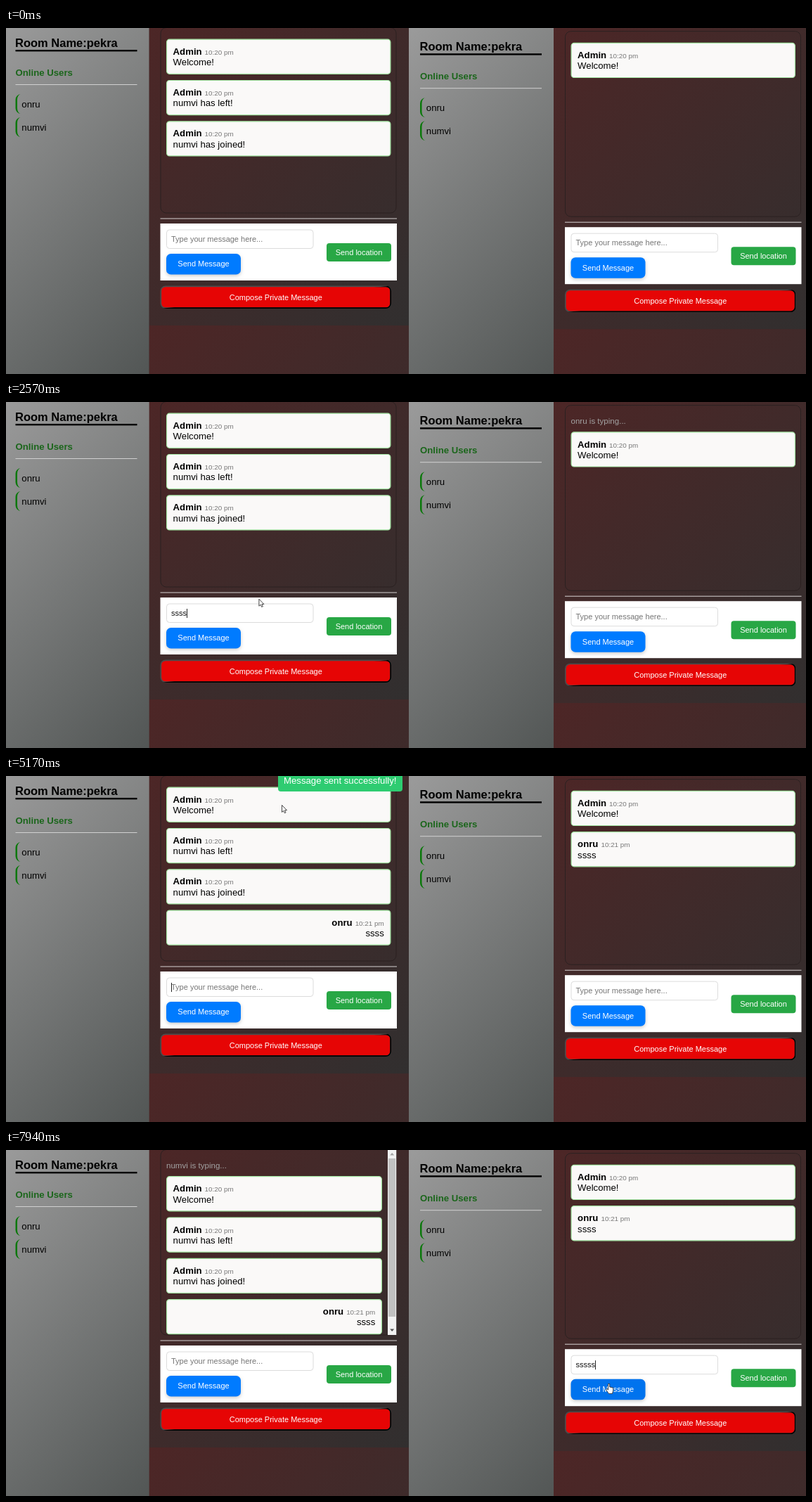
An HTML page with a canvas that plays this animation: 1138 px wide and 492 px high, repeating every 8 s.

```html
<!DOCTYPE html>
<html lang="en">
<head>
<meta charset="utf-8">
<title>Two chat windows</title>
<style>
  html, body { margin: 0; width: 100%; height: 100%; overflow: hidden; background: #3a2b2b; }
  canvas { display: block; }
</style>
</head>
<body>
<canvas id="stage" width="1138" height="492"></canvas>
<script>
const ctx = document.getElementById('stage').getContext('2d');
const LOOP = 8000;
const SANS = '"Liberation Sans", Arial, sans-serif';
const ROOM = 'pekra', FIRST = 'onru', SECOND = 'numvi';
const LEFT = { x: 0, y: 0 }, RIGHT = { x: 575.5, y: 5.2 };

// Moments in ms
const FOCUS_LEFT = 1150, PRESS = 3730, SENT = 3860, FOCUS_RIGHT = 6590, TOAST_END = 6860;
const LEFT_TYPING = { start: 1420, every: 265, count: 4 };
const RIGHT_TYPING = { start: 6880, every: 150, count: 5 };

// Layout at 82.5 % page zoom
const BODY = 13.2, SMALL = 11, TINY = 9.9;
const box = (x, y, w, h) => ({ x, y, w, h });
const CHAT = box(219.5, -1, 336, 264.5);
const INPUT = box(228, 286.5, 209.5, 27.5);
const SEND = box(228, 321, 106, 29.5);
const LOCATE = box(456, 306, 92, 26);
const PRIVATE = box(219.5, 366.5, 328.5, 32.5);

// Each pointer move starts where the last one ended; bend bows it sideways
const move = (start, end, x, y, bend = 0) => ({ start, end, x, y, bend });
const MOVES = [
  move(0, 70, 775, 440),
  move(70, 550, 309, 303),
  move(2420, 2760, 430, 247),
  move(2770, 3200, 290, 303, -1.5),
  move(3270, 3470, 268, 331),
  move(4160, 4960, 402, 3, .35),
  move(5030, 5580, 341, 235),
  move(5600, 5980, 430, 145),
  move(5990, 6410, 857, 302, -.7),
  move(7200, 7560, 965, 385),
  move(7800, 7950, 857, 332, -.4)
];

const clamp = (v, lo, hi) => Math.min(hi, Math.max(lo, v));
const smooth = k => k * k * (3 - 2 * k);

function pointer(t) {
  const i = Math.max(0, MOVES.findLastIndex(m => m.start <= t));
  const b = MOVES[i], a = MOVES[Math.max(0, i - 1)];
  const u = smooth(clamp((t - b.start) / (b.end - b.start), 0, 1));
  const dx = b.x - a.x, dy = b.y - a.y, bow = 2 * u * (1 - u) * b.bend;
  return { x: a.x + dx * u - dy * bow, y: a.y + dy * u + dx * bow };
}

const inside = (p, b, o) =>
  p.x >= b.x + o.x && p.x <= b.x + o.x + b.w && p.y >= b.y + o.y && p.y <= b.y + o.y + b.h;

const hovered = (t, b, o) => t >= 70 && inside(pointer(t), b, o);

// Share of the last 180 ms spent over a box: a colour transition without stored state
function hoverFade(t, b, o) {
  let hits = 0;
  for (let ago = 0; ago < 180; ago += 10) hits += hovered(t - ago, b, o);
  return hits / 18;
}

const typed = (k, t) => clamp(Math.floor((t - k.start) / k.every) + 1, 0, k.count);

// The caret blinks from the last focus or key press
function caretOn(t, focus, end, keys) {
  if (t < focus || t >= end) return false;
  const n = keys ? typed(keys, t) : 0;
  const since = n ? keys.start + (n - 1) * keys.every : focus;
  return Math.floor((t - since) / 530) % 2 === 0;
}

const mix = (a, b, k) => `rgb(${a.map((v, i) => Math.round(v + (b[i] - v) * k))})`;

function text(str, x, y, size, color, { bold = false, align = 'left', font = SANS } = {}) {
  ctx.font = `${bold ? 'bold ' : ''}${size}px ${font}`;
  ctx.textAlign = align;
  ctx.fillStyle = color;
  ctx.fillText(str, x, y);
  return ctx.measureText(str).width;
}

function rect(x, y, w, h, color) {
  ctx.fillStyle = color;
  ctx.fillRect(x, y, w, h);
}

function round(b, r, fill, stroke, line = 1) {
  const i = stroke ? line / 2 : 0;
  ctx.beginPath();
  ctx.roundRect(b.x + i, b.y + i, b.w - 2 * i, b.h - 2 * i, r);
  if (fill) { ctx.fillStyle = fill; ctx.fill(); }
  if (stroke) { ctx.strokeStyle = stroke; ctx.lineWidth = line; ctx.stroke(); }
}

function clipped(b, paint) {
  ctx.save();
  ctx.beginPath();
  ctx.rect(b.x, b.y, b.w, b.h);
  ctx.clip();
  paint();
  ctx.restore();
}

function diagonal(x, y, w, h, from, to) {
  const cx = x + w / 2, cy = y + h / 2, d = (w + h) / 4;
  const g = ctx.createLinearGradient(cx - d, cy - d, cx + d, cy + d);
  g.addColorStop(0, from);
  g.addColorStop(1, to);
  rect(x, y, w, h, g);
}

function sidebar() {
  diagonal(-3, -17, 206.5, 520, '#9c9c9c', '#515554');
  text('Room Name:' + ROOM, 13, 27, 16.5, '#000', { bold: true });
  rect(13.5, 31, 173, 2.4, '#000');
  text('Online Users', 13.5, 67.7, BODY, '#1b661b', { bold: true });
  rect(13.5, 80, 173, 1, '#d0d0d0');
  [FIRST, SECOND].forEach((name, i) => {
    const y = 94 + i * 33, inner = { x: 5.5, y: 8 };
    ctx.beginPath();
    ctx.roundRect(13.5, y, 160, 28, [8, 0, 0, 8]);
    ctx.roundRect(16, y, 157.5, 28, [inner, 0, 0, inner]);
    ctx.fillStyle = '#0a780a';
    ctx.fill('evenodd');
    text(name, 22.3, y + 18.5, BODY, '#000');
  });
}

function message(m, y, right) {
  round(box(228, y, right - 228, 50.3), 4, '#faf9f8', '#a2e6a2', 1.2);
  const head = y + 22.2, foot = y + 37.4;
  if (m.own) {
    const edge = right - 9.7, align = 'right';
    const w = text(m.time, edge, head, TINY, '#777', { align });
    text(m.who, edge - w - 4, head, BODY, '#000', { bold: true, align });
    text(m.body, edge, foot, BODY, '#000', { align });
  } else {
    const w = text(m.who, 237.6, head, BODY, '#000', { bold: true });
    text(m.time, 237.6 + w + 4, head, TINY, '#777');
    text(m.body, 237.6, foot, BODY, '#000');
  }
}

function scrollArrow(y, dy, color) {
  ctx.fillStyle = color;
  ctx.fill(new Path2D(`M546.2 ${y}h6l-3 ${dy}z`));
}

function scrollbar() {
  rect(543, -2, 12.5, 265, '#f1f1f1');
  rect(544, 12, 10, 225, '#c1c1c1');
  scrollArrow(7.5, -3.5, '#a3a3a3');
  scrollArrow(254.5, 3.5, '#505050');
}

function chat(w) {
  round(CHAT, 8, null, '#2b2121');
  const crowded = w.typing && w.messages.length > 3;
  clipped(CHAT, () => {
    if (w.typing) text(w.typing + ' is typing...', 228, 25.8, 11.55, '#a3a3a3');
    w.messages.forEach((m, i) =>
      message(m, 15.6 + i * 58.3 + (w.typing ? 21.5 : 0), crowded ? 535 : 547.5));
    if (crowded) scrollbar();
  });
}

function sendButton(amount, focused) {
  ctx.save();
  ctx.translate(0, -1.65 * amount);
  if (focused) round(box(SEND.x - 2.6, SEND.y - 2.6, SEND.w + 5.2, SEND.h + 5.2), 8, '#94c6fb');
  ctx.save();
  ctx.shadowColor = 'rgba(0,0,0,.2)';
  ctx.shadowBlur = 5;
  ctx.shadowOffsetY = 2;
  round(SEND, 6.6, mix([0, 123, 255], [0, 86, 179], amount));
  ctx.restore();
  text('Send Message', 281, 339.3, SMALL, '#fff', { align: 'center' });
  ctx.restore();
}

function privateButton(over) {
  const { x, y, w, h } = PRIVATE;
  round(PRIVATE, 6.6, over ? '#c80404' : '#e60505', '#4c4c4c', 1.65);
  // Outset border: the lower right half is black
  ctx.save();
  ctx.clip(new Path2D(`M${x} ${y + h}L${x + w} ${y}v${h}z`));
  round(PRIVATE, 6.6, null, '#000', 1.65);
  ctx.restore();
  text('Compose Private Message', x + w / 2, 386.8, SMALL, '#fff', { align: 'center' });
}

function form(w) {
  rect(219.5, 270.5, 336.5, 1, '#d6d2d2');
  rect(219.5, 278, 336.5, 81, '#fff');
  round(INPUT, 4, '#fff', '#dcdcdc');
  if (!w.draft) text('Type your message here...', 235, 304, SMALL, '#757575');
  const width = text(w.draft, 235, 304, SMALL, '#111');
  if (w.caret) rect(235 + width, 294, 1, 13, '#222');
  sendButton(w.sendHover, w.sendFocus);
  round(LOCATE, 4, '#28a745');
  text('Send location', 502, 322.6, SMALL, '#fff', { align: 'center' });
  privateButton(w.privateHover);
}

function chatWindow(w, x, width) {
  clipped(box(x, 0, width, 492), () => {
    ctx.translate(w.origin.x, w.origin.y);
    for (const top of [-17, 423]) diagonal(203.5, top, 372, 440, '#4d2626', '#312f2f');
    sidebar();
    chat(w);
    form(w);
    if (w.toast) {
      round(box(387, -12, 177, 34), 4, '#2ecc71');
      text('Message sent successfully!', 395, 11, BODY, '#fff');
    }
  });
}

const SHAPES = {
  arrow: new Path2D('M.5.5v10l2.3-2 1.5 3.3 1.7-.8-1.5-3.2h3z'),
  hand: new Path2D('M-1-1h2v4.5l5 1.2v4l-1.2 4.3h-5l-4-5.5 1-1.5 2.2 1.6z'),
  beam: new Path2D('M-2.5-5.5h5M-2.5 5.5h5M0-5.5v11')
};

function drawPointer(t) {
  const hiddenWhileTyping =
    (t >= LEFT_TYPING.start && t < 2420) || (t >= RIGHT_TYPING.start && t < 7200);
  if (t < 70 || hiddenWhileTyping) return;
  const p = pointer(t);
  const over = boxes => boxes.some(b => inside(p, b, LEFT) || inside(p, b, RIGHT));
  const kind = over([SEND, LOCATE, PRIVATE]) ? 'hand' : over([INPUT]) ? 'beam' : 'arrow';
  ctx.save();
  ctx.translate(p.x, p.y);
  if ([FOCUS_LEFT, PRESS, FOCUS_RIGHT].some(c => t >= c && t < c + 130)) {
    ctx.beginPath();
    ctx.arc(0, 0, 9, 0, 7);
    ctx.fillStyle = 'rgba(235,220,20,.6)';
    ctx.fill();
  }
  ctx.fillStyle = '#fff';
  ctx.strokeStyle = '#333';
  ctx.lineWidth = .9;
  if (kind !== 'beam') ctx.fill(SHAPES[kind]);
  ctx.stroke(SHAPES[kind]);
  ctx.restore();
}

function tooltip() {
  ctx.save();
  ctx.shadowColor = 'rgba(0,0,0,.3)';
  ctx.shadowBlur = 2;
  ctx.shadowOffsetX = ctx.shadowOffsetY = 1;
  rect(315, 314, 112.5, 19, '#767676');
  ctx.restore();
  rect(316, 315, 110.5, 17, '#fff');
  text('Lütfen bu alanı doldurun.', 320, 326.8, 8.55, '#575757', { font: '"Open Sans", "Noto Sans", sans-serif' });
}

const admin = body => ({ who: 'Admin', time: '10:20 pm', body });

function draw(t) {
  const sent = t >= SENT;
  const reply = own => sent ? [{ who: FIRST, time: '10:21 pm', body: 'ssss', own }] : [];
  const base = origin => ({
    origin,
    sendHover: hoverFade(t, SEND, origin),
    privateHover: hovered(t, PRIVATE, origin)
  });
  chatWindow({
    ...base(LEFT),
    messages: [admin('Welcome!'), admin(SECOND + ' has left!'), admin(SECOND + ' has joined!'), ...reply(true)],
    typing: t >= RIGHT_TYPING.start + 50 && SECOND,
    draft: sent ? '' : 's'.repeat(typed(LEFT_TYPING, t)),
    caret: sent ? caretOn(t, SENT + 5, FOCUS_RIGHT) : caretOn(t, FOCUS_LEFT, PRESS, LEFT_TYPING),
    sendFocus: t >= PRESS && !sent,
    toast: sent && t < TOAST_END
  }, 0, 573);
  chatWindow({
    ...base(RIGHT),
    messages: [admin('Welcome!'), ...reply(false)],
    typing: t >= LEFT_TYPING.start + 70 && !sent && FIRST,
    draft: 's'.repeat(typed(RIGHT_TYPING, t)),
    caret: caretOn(t, FOCUS_RIGHT, LOOP, RIGHT_TYPING)
  }, 573, 565);
  if (t >= 1080 && t < FOCUS_LEFT) tooltip();
  drawPointer(t);
}

function tick(now) {
  draw(now % LOOP);
  requestAnimationFrame(tick);
}
requestAnimationFrame(tick);
</script>
</body>
</html>
```
